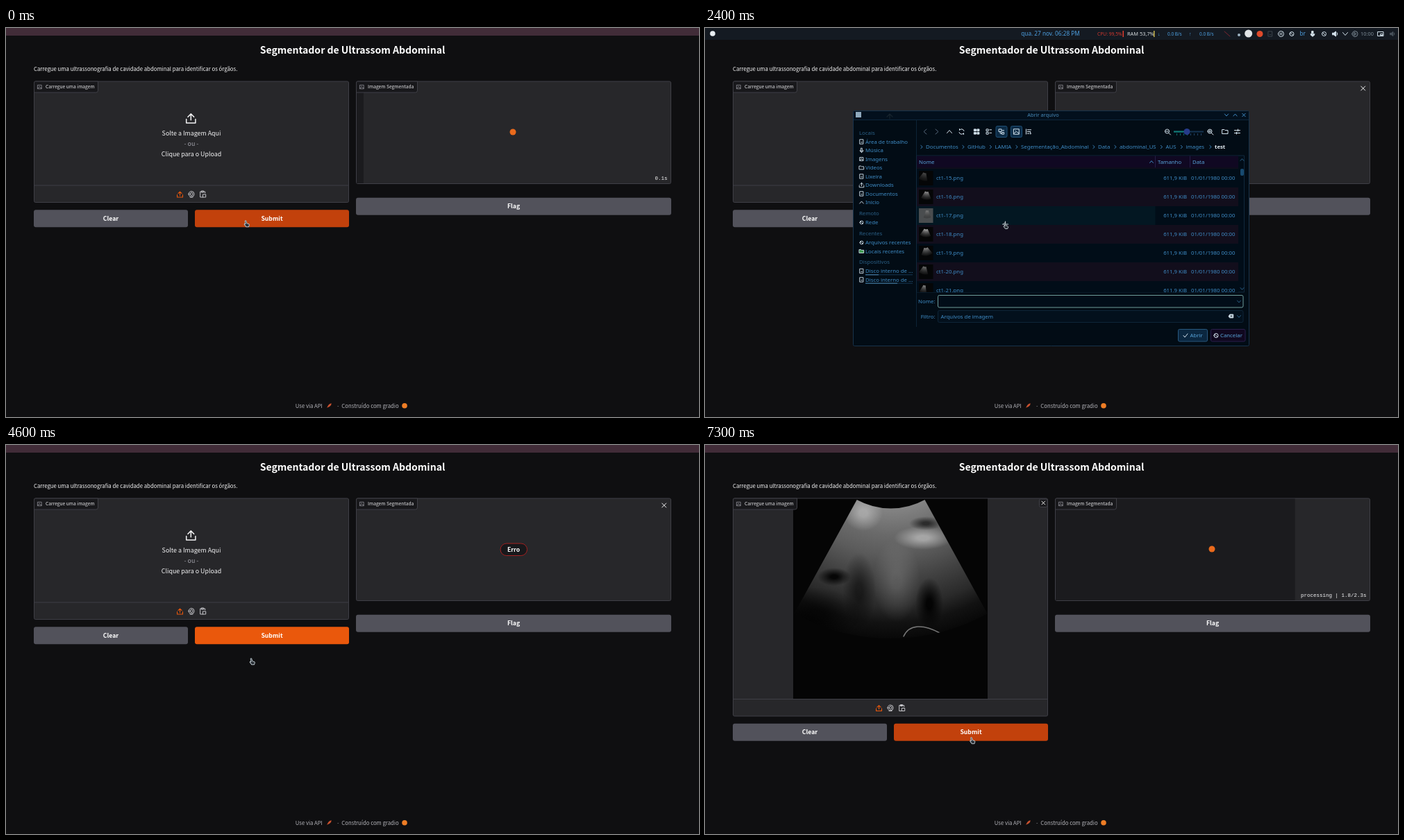
An HTML page with a canvas that plays this animation: 998 by 561 pixels, repeating every 8000 ms.

```html
<!DOCTYPE html>
<html lang="pt">
<head>
<meta charset="utf-8">
<title>Segmentador de Ultrassom Abdominal</title>
<style>
  html, body { margin: 0; width: 100%; height: 100%; overflow: hidden; background: #0f0f11; }
  canvas { display: block; }
</style>
</head>
<body>
<canvas id="stage" width="998" height="561"></canvas>
<script>
const ctx = document.getElementById('stage').getContext('2d');
const LOOP = 8000;
const WEB = '"Noto Sans CJK JP", "Noto Sans CJK SC", "Noto Sans CJK", sans-serif';
const DESK = '"Noto Sans", sans-serif';
const MONO = '"Liberation Mono", monospace';
const BLUE = '#3f8cc6', DIM = '#2b6087', PALE = '#d5e4ee';

// ---------- helpers ----------
function text(str, x, y, size, color, { font = WEB, align = 'left', weight = 400 } = {}) {
  ctx.font = `${weight} ${size}px ${font}`;
  ctx.textAlign = align;
  ctx.fillStyle = color;
  ctx.fillText(str, x, y + size * 0.36);
}
const desk = (str, x, y, color = BLUE, align = 'left', size = 7.8, weight = 400) =>
  text(str, x, y, size, color, { font: DESK, align, weight });

function box(x, y, w, h, fill, border, radius = 0) {
  ctx.beginPath();
  ctx.roundRect(x, y, w, h, radius);
  if (fill) { ctx.fillStyle = fill; ctx.fill(); }
  if (border) { ctx.strokeStyle = border; ctx.lineWidth = 1; ctx.stroke(); }
}
function dot(x, y, r, fill) {
  ctx.beginPath();
  ctx.arc(x, y, r, 0, 7);
  ctx.fillStyle = fill;
  ctx.fill();
}
function icon(path, x, y, color = PALE, scale = 1, width = 1, fill) {
  ctx.save();
  ctx.translate(x, y);
  ctx.scale(scale, scale);
  ctx.lineWidth = width / scale;
  ctx.lineCap = ctx.lineJoin = 'round';
  const shape = new Path2D(path);
  if (fill) { ctx.fillStyle = fill; ctx.fill(shape); }
  ctx.strokeStyle = color;
  if (color) ctx.stroke(shape);
  ctx.restore();
}
const circle = r => `M${-r} 0a${r} ${r} 0 1 0 ${2 * r} 0a${r} ${r} 0 1 0 ${-2 * r} 0z`;
const ICONS = {
  upload: 'M-6 1V6H6V1M0 2V-6M-4 -2L0 -6L4 -2',
  webcam: circle(4) + circle(2) + 'M-2 4.5H2',
  paste: 'M3 -2V-4H-4V4H0M-2 -5H1V-3H-2zM0 0H4V4H0z',
  picture: 'M-3 -3H3V3H-3zM-3 2L0 0L3 2M-1 -1h.2',
  cross: 'M-3 -3L3 3M3 -3L-3 3',
  left: 'M2 -3.5L-2 0L2 3.5', right: 'M-2 -3.5L2 0L-2 3.5',
  up: 'M-3.5 2L0 -2L3.5 2', down: 'M-3.5 -2L0 2L3.5 -2',
  refresh: 'M3.5 -1A3.6 3.6 0 0 0 -3 -2V-4M-3.5 1A3.6 3.6 0 0 0 3 2V4',
  grid: 'M-4 -4h3v3h-3zM1 -4h3v3h-3zM-4 1h3v3h-3zM1 1h3v3h-3z',
  list: 'M-4 -4h3v3h-3zM-4 1h3v3h-3zM1 -3H4M1 2H4',
  tree: 'M-4 -4h4v4h-4zM1 1h3v3h-3zM-2 0V3H1M1 -2H4',
  sort: 'M-4 -4V4M-2 -3H4M-2 0H3M-2 3H1M3 1V4L4 3',
  zoom: circle(3) + 'M2.5 2.5L5 5M-1.5 0H1.5',
  plus: 'M0 -1.5V1.5',
  folder: 'M-4 -3H-1L0 -2H4V3H-4z',
  tune: 'M-4 -2H4M-4 2H4M1 -3.5V-.5M-1 .5V3.5',
  page: 'M-3 -4H3V4H-3zM-1 1H1',
  forbid: circle(3) + 'M-2 -2L2 2',
  clear: 'M-4 0L-2 -3H4V3H-2z',
  check: 'M-3 0L-1 2.5L3 -2.5',
  mic: 'M-1 -4H1V1H-1zM-3 0Q-3 3 0 3Q3 3 3 0M0 3V4',
  speaker: 'M-4 -1.5H-2L1 -4V4L-2 1.5H-4zM3 -2Q4.5 0 3 2',
  hand: 'M-3 -5Q-2 -6 -1 -5L0 -1L3 0Q5 1 4 3L3 5H-1L-4 1Q-4 -1 -2 0z'
};

// ---------- web page ----------
function label(str, x) {
  box(x + .5, 77, 92 - (x > 500 ? 4 : 0), 16, '#18181b', '#3f3f46', [2, 0, 3, 0]);
  icon(ICONS.picture, x + 8.5, 85, '#a1a1aa', .9, .7);
  text(str, x + 17, 85, 6.7, '#e4e4e7');
}
function button(str, x, y, w, fill) {
  box(x, y, w, 25, fill, null, 3);
  text(str, x + w / 2, y + 12.3, 8.7, '#fff', { align: 'center', weight: 700 });
}
function glow(x, y, rx, ry, color) {
  ctx.save();
  ctx.translate(x, y);
  ctx.scale(rx, ry);
  const g = ctx.createRadialGradient(0, 0, .2, 0, 0, 1);
  g.addColorStop(0, color);
  g.addColorStop(1, color.replace(/[\d.]+\)$/, '0)'));
  ctx.fillStyle = g;
  ctx.fillRect(-1, -1, 2, 2);
  ctx.restore();
}
function fan(x, y, inner, outer, spread, fill) {
  ctx.beginPath();
  ctx.arc(x, y, inner, Math.PI / 2 - spread, Math.PI / 2 + spread);
  ctx.arc(x, y, outer, Math.PI / 2 + spread, Math.PI / 2 - spread, true);
  ctx.closePath();
  ctx.fillStyle = fill;
  ctx.fill();
}
function ultrasound() {
  ctx.save();
  ctx.beginPath();
  ctx.rect(127, 77.5, 280, 288.5);
  ctx.clip();
  ctx.fillStyle = '#050505';
  ctx.fillRect(127, 77, 280, 290);
  const g = ctx.createRadialGradient(267.6, -10, 101, 267.6, -10, 289);
  [[0, 132], [.2, 106], [.35, 92], [.55, 66], [.75, 42], [.88, 18], [1, 8]]
    .forEach(([at, v]) => g.addColorStop(at, `rgb(${v},${v},${v})`));
  fan(267.6, -10, 101.6, 289, .502, g);
  ctx.clip();
  glow(228, 98, 28, 26, 'rgba(220,220,220,.45)');
  glow(314, 134, 42, 17, 'rgba(230,230,230,.5)');
  glow(276, 195, 34, 60, 'rgba(170,170,170,.25)');
  glow(318, 113, 24, 10, 'rgba(0,0,0,.6)');
  glow(186, 190, 24, 13, 'rgba(0,0,0,.9)');
  glow(222, 210, 24, 55, 'rgba(0,0,0,.5)');
  glow(160, 245, 65, 40, 'rgba(0,0,0,.6)');
  glow(323, 229, 20, 38, 'rgba(0,0,0,.9)');
  icon('M286 276Q292 263 306 262T338 271', 0, 0, '#777', 1, 1.5);
  ctx.restore();
}
function drawPage(t, pointer) {
  const loaded = t >= 4900, shift = loaded ? 139.5 : 0;
  const running = t < 400 || t >= 5500;
  ctx.fillStyle = '#0f0f11';
  ctx.fillRect(0, 0, 998, 561);
  ctx.fillStyle = '#412c38';
  ctx.fillRect(0, 0, 998, 11);
  text('Segmentador de Ultrassom Abdominal', 499, 32, 14.04, '#fff', { align: 'center', weight: 700 });
  text('Carregue uma ultrassonografia de cavidade abdominal para identificar os órgãos.', 40, 59.5, 7.78, '#f4f4f5');

  // input panel
  box(40.5, 77, 453, 174.5 + shift, '#27272a', '#3f3f46', 2);
  if (loaded) {
    ultrasound();
    box(481.5, 78, 11.5, 11.5, '#18181b', '#3f3f46', 2);
    icon(ICONS.cross, 487.3, 83.5, '#fff', .8, .9);
  } else {
    icon(ICONS.upload, 266.3, 130.5, '#f4f4f5', 1.1, 1.5);
    text('Solte a Imagem Aqui', 267, 151.5, 8.88, '#f4f4f5', { align: 'center' });
    text('- ou -', 267, 167, 8.88, '#a1a1aa', { align: 'center' });
    text('Clique para o Upload', 267, 182, 8.88, '#f4f4f5', { align: 'center' });
  }
  ctx.fillStyle = '#3f3f46';
  ctx.fillRect(40, 226.5 + shift, 454, 1);
  icon(ICONS.upload, 250.5, 240 + shift, '#ea580c', .66, 1.1);
  icon(ICONS.webcam, 267, 239.5 + shift, '#c4c4c8', 1, 1);
  icon(ICONS.paste, 283.7, 240 + shift, '#c4c4c8', 1, 1);
  label('Carregue uma imagem', 40);

  const submitY = 262.3 + shift, tipY = pointer.y - 5;
  const hover = pointer.x > 272 && pointer.x < 494 && tipY > submitY && tipY < submitY + 25;
  button('Clear', 40, submitY, 222, '#52525b');
  button('Submit', 272, submitY, 222, hover ? '#c2410c' : '#ea580c');

  // output panel
  box(504.5, 77, 453, 147.5, '#27272a', '#3f3f46', 2);
  if (running) drawProgress(t);
  else {
    box(712, 142, 38.5, 17.5, '#18181b', '#a32020', 9);
    text('Erro', 731, 150.5, 8.6, '#fff', { align: 'center', weight: 700 });
    icon(ICONS.cross, 947.7, 87, '#f4f4f5', 1, 1);
  }
  label('Imagem Segmentada', 504);
  button('Flag', 504, 244.7, 454, '#52525b');

  // footer
  text('Use via API', 416.8, 545, 7.7, '#b4b4ba');
  icon('M-3 3L-1 -1Q1 -4 4 -4Q4 -1 1 1z', 465, 545, '', .95, 1, '#c8512f');
  text('·', 476, 545, 7.7, '#b4b4ba');
  text('Construído com gradio', 483.3, 545, 7.75, '#b4b4ba');
  dot(574, 544.7, 3.8, '#ee7d25');
}
// The recorded counter stalls while the machine is busy.
function stalled(t) {
  for (const [from, to] of [[5700, 6000], [6100, 6900], [7300, LOOP]])
    if (t >= from && t < to) return from;
  return t;
}
function drawProgress(t) {
  const now = Math.floor(stalled(t) / 100) * 100;
  const seconds = (t < 5500 ? now + 100 : now - 5500) / 1000;
  const share = Math.max(0, (seconds - .05) / 2.3);
  ctx.fillStyle = '#1b1b1e';
  ctx.fillRect(505, 77.5, 453 * share, 146.5);
  dot(730, 150, 4.5, '#ea6a1c');
  const count = seconds.toFixed(1);
  text(t >= 6100 ? `processing | ${count}/2.3s` : `${count}s`, 952.5, 216.5, 7.5, '#f4f4f5',
    { font: MONO, align: 'right' });
}

// ---------- desktop panel ----------
function drawTray(t) {
  ctx.fillStyle = '#141a22';
  ctx.fillRect(0, 0, 998, 17);
  dot(11, 8, 3.8, '#e8eef2');
  desk('qua. 27 nov. 06:28 PM', 497.5, 8.5, '#4d9fe0', 'center', 8.25);
  desk(`CPU: ${t < 3800 ? '99,5' : '99.0'}%`, 565, 8.5, '#d2382f', 'left', 6.7);
  desk('RAM 53,7%', 608, 8.5, '#d8dde0', 'left', 7.4);
  box(601.5, 4, 1.5, 9, '#e03a2d');
  box(646, 4, 1.5, 9, '#c9b64c');
  desk('↓', 652, 8.5, '#4d9fe0', 'left', 7);
  desk('0.0 B/s', 666, 8.5, '#4d9fe0', 'left', 6.5);
  desk('↑', 697, 8.5, '#4d9fe0', 'left', 7);
  desk('0.0 B/s', 712, 8.5, '#4d9fe0', 'left', 6.5);
  icon('M-4 -3L4 4', 752, 8, '#7c2630');
  dot(769, 10, 2, '#9eb4c4');
  dot(782.7, 8, 5.5, '#dfe3e6');
  dot(799, 8.5, 4.5, '#de4a2b');
  icon(ICONS.page, 814, 8.5, '#3c444c', .9);
  icon(circle(4) + 'M-1.2 -1.5V1.5M1.2 -1.5V1.5', 829.5, 8.5);
  icon(ICONS.forbid, 845, 8.5);
  desk('br', 856.5, 8.5, '#4d9fe0', 'left', 8);
  icon(ICONS.mic, 875, 8.5, PALE, 1, 1, PALE);
  icon(ICONS.forbid, 891.5, 8.5);
  icon(ICONS.speaker, 907.5, 8.5, PALE, .9, 1, PALE);
  icon(ICONS.down, 922, 8.5);
  icon(circle(4) + 'M-1 -2L2 0L-1 2z', 936, 8.5, '#7d8b96');
  desk('10:00', 944, 8.5, '#7d8b96', 'left', 7.4);
  icon('M-4 -3H4V3H-4zM0 0H3V2H0z', 973, 8.5);
  icon(ICONS.speaker, 990, 8.5, '#48525c', .8, 1, '#48525c');
}

// ---------- file dialog ----------
const PLACES = [
  ['Locais', 151], ['Área de trabalho', 164, 'page'], ['Música', 176.5, 'mic'], ['Imagens', 189, 'picture'],
  ['Vídeos', 201.5, 'folder'], ['Lixeira', 214, 'page'], ['Downloads', 226.5, 'upload'],
  ['Documentos', 239, 'page'], ['Início', 251.5, 'up'], ['Remoto', 267.5], ['Rede', 280.5, 'forbid'],
  ['Recentes', 296.5], ['Arquivos recentes', 309.5, 'forbid'], ['Locais recentes', 322, 'folder'],
  ['Dispositivos', 337.5], ['Disco interno de ...', 350.5, 'page'], ['Disco interno de ...', 363, 'page']
];
const CRUMBS = [['Documentos', 318], ['GitHub', 378], ['LAMIA', 417.5], ['Segementação_Abdominal', 455],
  ['Data', 566], ['abdominal_US', 597], ['AUS', 663.5], ['images', 692.5], ['test', 734]];

const random = n => { const v = Math.sin(n * 91.7) * 4375.5; return v - Math.floor(v); };

function thumbnail(n, y, lit) {
  box(308, y - 10.5, 20.5, 21, lit ? '#4a4d4f' : '#050607');
  const shade = 70 + 120 * random(n) + (lit ? 30 : 0);
  ctx.save();
  ctx.translate(317 + 3 * random(n + 7), y - 12);
  ctx.rotate((random(n + 3) - .5) * .5);
  const g = ctx.createRadialGradient(0, 0, 4, 0, 0, 17);
  g.addColorStop(0, `rgb(${shade},${shade},${shade})`);
  g.addColorStop(1, 'rgba(30,30,30,.3)');
  fan(0, 0, 5, 16, .3 + .25 * random(n + 5), g);
  ctx.restore();
}
function drawRows(t, pointer) {
  const scroll = 1494.5 * Math.min(1, Math.max(0, (t - 2250) / 600));
  ctx.save();
  ctx.beginPath();
  ctx.rect(305, 201.5, 463, 179.5);
  ctx.clip();
  const first = Math.floor(scroll / 27) + 1;
  for (let n = first; n < first + 9; n++) {
    const y = 214.5 + 27 * (n - 1) - scroll;
    const selected = t >= 3700 && n === 60;
    const lit = selected || Math.abs(pointer.y - 5 - y) < 13.5;
    box(305, y - 13.5, 463, 27, n % 2 ? '#010d18' : '#120e1c');
    if (lit) box(305, y - 13.5, 343.5, 27, selected ? '#0b6e66' : '#031722');
    thumbnail(n, y, lit);
    desk(`ct1-${n}.png`, 333, y + .3, selected ? '#81484a' : BLUE);
    desk('611,9 KiB', 694, y + .3, BLUE, 'right');
    desk('01/01/1980 00:00', 700, y + .3);
  }
  ctx.restore();
  icon(ICONS.up, 773.5, 190, DIM, .7);
  icon(ICONS.down, 773.5, 376, DIM, .7);
  box(771, 203 + (scroll - 373.5) * .0214, 5, 10, '#174a70', null, 2);
}
function drawDialog(t, pointer) {
  const picked = t >= 3700;
  box(213.5, 119.5, 570, 339, '#020c15', '#17324a', 2);
  box(214, 120, 569, 12, '#03101d');
  box(214, 132, 569, .8, '#12304a');
  box(217, 121, 8, 8, '#8fa9bd');
  desk('Abrir arquivo', 487, 125.5, '#4789b8', 'center', 7.4);
  icon(ICONS.down, 751, 125.5, BLUE, .75);
  icon(ICONS.up, 763.5, 125.5, BLUE, .75);
  icon(ICONS.cross, 776, 125.5, BLUE, .75);
  icon('M-4 0L0 -4L4 0M0 -4V3', 266, 128, '#17232d', 1, 1.2);

  // places
  box(304, 133, .8, 298, '#102a3f');
  for (const [name, y, glyph] of PLACES) {
    if (glyph) icon(ICONS[glyph], 225.5, y, PALE, glyph === 'upload' ? .55 : .8, .9,
      name === 'Locais recentes' ? '#3d9b50' : undefined);
    desk(name, glyph ? 231 : 222, y, glyph ? BLUE : DIM);
  }
  for (const [y, w] of [[355.5, 19], [367.7, 46]]) {
    box(231, y, 68, .8, '#1a4567');
    box(231, y, w, .8, '#5e9fcc');
  }

  // toolbar
  icon(ICONS.left, 317, 149.5, '#55677a');
  icon(ICONS.right, 334, 149.5, '#55677a');
  icon(ICONS.up, 352, 149.5);
  icon(ICONS.refresh, 369.5, 149.5);
  icon(ICONS.grid, 391.3, 149.5, PALE, .9, 1, PALE);
  icon(ICONS.list, 409, 149.5, PALE, .9);
  box(419, 141.5, 16, 16, '#0c2b45', '#1f4f75', 2);
  icon(ICONS.tree, 427, 149.5, PALE, .9);
  box(440.5, 141.5, 16, 16, '#0c2b45', '#1f4f75', 2);
  icon(ICONS.picture, 448.5, 149.5, PALE, 1.25);
  icon(ICONS.sort, 466, 149.5, PALE, .9);
  icon(ICONS.zoom, 665.5, 149);
  box(675, 148.5, 43, 2, '#143350');
  box(675, 148.5, 19, 2, '#0f7c76');
  for (let x = 679; x < 718; x += 5) box(x, 152, .8, 3, x < 695 ? '#0f7c76' : '#27507a');
  dot(694, 149.5, 4.5, '#263b8a');
  icon(ICONS.zoom + ICONS.plus, 727, 149);
  icon(ICONS.folder, 749, 149.5);
  icon(ICONS.tune, 766.5, 149.5);
  CRUMBS.forEach(([name, x], i) => {
    const last = i === CRUMBS.length - 1;
    icon(ICONS.right, x - 6, 171.5, BLUE, .6, .9);
    desk(name, x, 171.3, last ? '#e6eef4' : BLUE, 'left', 7.8, last ? 700 : 400);
  });

  // file list
  box(304.5, 184, 472, 197, '#010d18', '#10283c');
  box(305, 184.5, 463, 17, '#100822');
  desk('Nome', 308, 193, '#58a4da');
  desk('Tamanho', 652, 193, '#58a4da');
  desk('Data', 702, 193, '#58a4da');
  box(648, 184.5, .8, 17, '#2b2450');
  box(698, 184.5, .8, 17, '#2b2450');
  icon(ICONS.up, 643, 193, BLUE, .7);
  drawRows(t, pointer);

  // fields and buttons
  desk('Nome:', 331.5, 394.3, BLUE, 'right');
  desk('Filtro:', 331.5, 415.7, BLUE, 'right');
  box(335.5, 385.5, 439.5, 17.5, '#010d18', picked ? '#34536a' : '#6f9c9a', 2);
  box(335.5, 407.5, 439.5, 17, '#03101c', '#0e2538', 2);
  if (picked) {
    desk('ct1-60.png', 339.5, 394.5);
    icon(ICONS.clear + 'M0 -1L2 1M2 -1L0 1', 757.5, 394, '#44617a', .8, 1);
  } else if (t % 1000 >= 500) box(339.3, 389, .9, 11, '#c8dbe8');
  desk('Arquivos de imagem', 339.5, 416);
  icon(ICONS.clear, 757.5, 415.5, PALE, .8, 1, PALE);
  icon('M-.5 -1L1.5 1M1.5 -1L-.5 1', 757.5, 415.5, '#03101c', 1, .9);
  icon(ICONS.down, 769, 394.5, DIM, .7);
  icon(ICONS.down, 769, 416, DIM, .7);
  box(681.5, 434.5, 42, 17.5, '#0b2740', '#28577d', 2);
  icon(ICONS.check, 692, 443.5);
  desk('Abrir', 698.5, 443.5, '#58a4da');
  box(728.5, 434.5, 49.5, 17.5, '#10081f', '#2b1f4b', 2);
  icon(ICONS.forbid, 736, 443.5);
  desk('Cancelar', 742, 443.5, '#58a4da');
}

// ---------- pointer and timeline ----------
const TRACK = [[0, 346, 282], [1300, 346, 282], [1600, 290, 185], [2100, 290, 185], [2400, 432.5, 285],
  [2900, 434.5, 281], [3000, 434.5, 281], [3600, 354, 312], [4900, 354, 312], [5200, 384, 426], [7300, 384.5, 426]];

function pointerAt(t) {
  const i = TRACK.findIndex(p => p[0] > t);
  if (i < 0) return { x: 384.5, y: 426 };
  const [t0, x0, y0] = TRACK[i - 1], [t1, x1, y1] = TRACK[i];
  const k = (t - t0) / (t1 - t0), e = k * k * (3 - 2 * k);
  return { x: x0 + (x1 - x0) * e, y: y0 + (y1 - y0) * e };
}
function draw(t) {
  const pointer = pointerAt(t), dialogOpen = t >= 2200 && t < 4400;
  drawPage(t, pointer);
  if (dialogOpen) {
    drawTray(t);
    drawDialog(t, pointer);
    icon('M-4 -2H4M0 -6V0', pointer.x, pointer.y, '#c9d0d4', 1, 1.2);
  }
  icon(ICONS.hand, pointer.x + .7, pointer.y + .5, '#b9c4ca', dialogOpen ? .8 : .85, 1, '#2c3138');
}
function tick() {
  draw(performance.now() % LOOP);
  requestAnimationFrame(tick);
}
tick();
</script>
</body>
</html>
```
